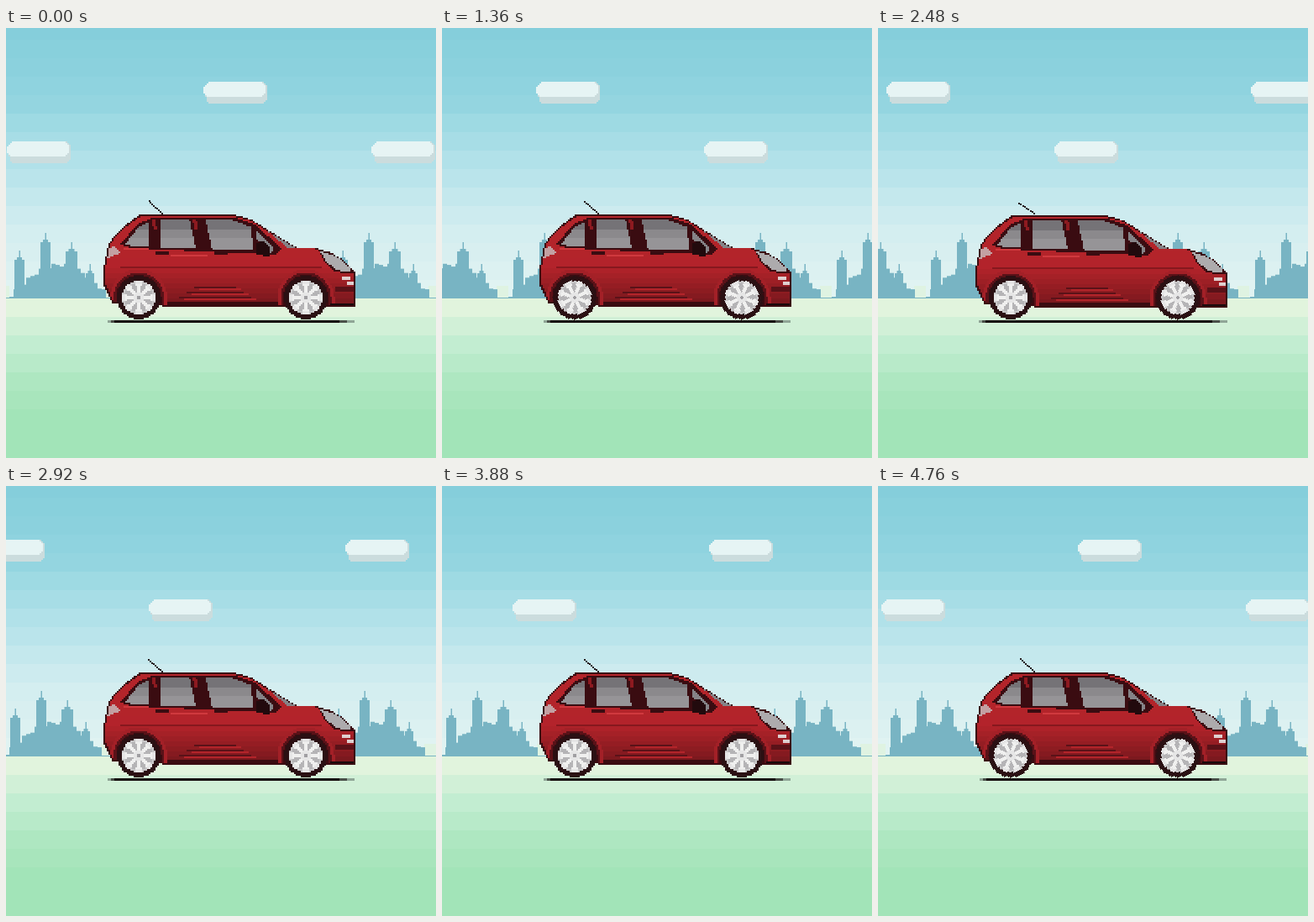
An HTML page with a canvas for the animation above (4.8 s loop, 512x512 px).

```html
<!DOCTYPE html>
<html lang="en">
<head>
<meta charset="utf-8">
<title>Red car drive</title>
<style>
html, body { margin: 0; width: 100%; height: 100%; overflow: hidden; }
canvas { display: block; width: 512px; height: 512px; }
</style>
</head>
<body>
<canvas id="stage" width="512" height="512"></canvas>
<script>
const LOOP = 4800, STEP = 40, CELL = 2;
const CLOUD_GAP = 434, CITY_GAP = 128.4;
const BAND = 22, BANDS = 24, HORIZON = 15;
const WHEELS = [158, 357], AXLE = 321;
const DARK = '#3a0c11', MAROON = '#5a1218', SHINE = '#d0393e', CITY = '#78b4c3';
const ctx = document.getElementById('stage').getContext('2d');

function layer(w, h, paint) {
  const canvas = document.createElement('canvas');
  canvas.width = w;
  canvas.height = h;
  paint(canvas.getContext('2d'));
  return canvas;
}

function rect(g, color, x, y, w, h) {
  g.fillStyle = color;
  g.fillRect(x, y, w, h);
}

// Fills a polygon in hard-edged square cells.
function poly(g, color, ...pts) {
  const n = pts.length / 2, ys = pts.filter((_, i) => i % 2);
  const snap = v => Math.round(v / CELL) * CELL;
  for (let y = snap(Math.min(...ys)); y < Math.max(...ys); y += CELL) {
    const xs = [], mid = y + CELL / 2;
    for (let i = 0; i < n; i++) {
      const j = (i + 1) % n;
      const x1 = pts[2 * i], y1 = pts[2 * i + 1], x2 = pts[2 * j], y2 = pts[2 * j + 1];
      if (y1 > mid !== y2 > mid) xs.push(x1 + (mid - y1) * (x2 - x1) / (y2 - y1));
    }
    xs.sort((a, b) => a - b);
    for (let i = 0; i + 1 < xs.length; i += 2) {
      rect(g, color, snap(xs[i]), y, snap(xs[i + 1]) - snap(xs[i]), CELL);
    }
  }
}

function arch(g, color, cx, r) {
  const pts = [];
  for (let a = Math.PI; a < 6.4; a += Math.PI / 16) {
    pts.push(cx + r * Math.cos(a), AXLE + r * Math.sin(a));
  }
  poly(g, color, ...pts, cx + r, 334, cx - r, 334);
}

// One pixel row per band, stretched when drawn.
const backdrop = layer(1, BANDS, g => {
  const fade = (from, to, ...colors) => {
    const ramp = g.createLinearGradient(0, from + .5, 0, to - .5);
    colors.forEach((c, i) => ramp.addColorStop(i / (colors.length - 1), c));
    rect(g, ramp, 0, from, 1, to - from);
  };
  fade(0, HORIZON, '#85cedb', '#90d4df', '#b1e1e9', '#d2edf0', '#e0f3f2');
  fade(HORIZON, BANDS, '#e1f4dd', '#c2edd1', '#aee7c1', '#a2e4b8', '#a2e4b8');
});

const cloud = layer(80, 30, g => {
  poly(g, '#cbdcdd', 0, 10, 6, 26, 70, 26, 76, 20, 76, 6, 70, 0);
  poly(g, '#e6f4f4', 0, 6, 6, 0, 70, 0, 74, 6, 74, 13, 69, 19, 5, 19, 0, 14);
});

const city = layer(130, 84, g => {
  rect(g, '#dff3e2', 114, 68, 14, 15);
  rect(g, CITY, 0, 82, 130, 1);
  for (let x = 0; x < 115; x += 5) {
    const h = 2 + 36 * Math.sin(Math.PI * x / 115) + x % 3 * 2;
    rect(g, CITY, x, 83 - h, 5, h);
  }
  for (const [mid, top, w] of [[12, 26, 12], [43, 5, 12], [74, 16, 14], [96, 42, 10]]) {
    rect(g, CITY, mid - .5, top, 1.5, 12);
    rect(g, CITY, mid - w / 4, top + 8, w / 2, 5);
    rect(g, CITY, mid - w / 2, top + 11, w, 72 - top);
  }
});

const glass = layer(512, 512, g => {
  poly(g, '#757377', 142, 257, 158, 237, 174, 229, 268, 228, 292, 237, 294, 265, 150, 260);
  g.globalCompositeOperation = 'source-atop';
  rect(g, '#8b898c', 0, 240, 512, 10);
  rect(g, '#969497', 0, 250, 512, 20);
  for (const [x, w, lean] of [[169, 14, 2], [218, 19, 9]]) {
    poly(g, DARK, x, 226, x + w, 226, x + w + lean, 266, x + lean, 266);
    poly(g, '#8d1a20', x + 3, 226, x + 8, 226, x + 11, 240, x + 7, 240);
  }
});

const car = layer(512, 512, g => {
  const shell = [
    160, 222, 270, 222, 292, 228, 345, 261, 368, 262, 386, 267, 401, 276,
    416, 290, 416, 332, 186, 331, 126, 327, 116, 305, 116, 287, 122, 258,
    128, 248, 140, 236
  ];
  const inset = shell.map((v, i) => i % 2 ? 276 + (v - 276) * .965 : 266 + (v - 266) * .987);
  poly(g, '#b3242a', ...inset);
  g.globalCompositeOperation = 'source-atop';

  // Flanks darken toward the sill
  for (let y = 274; y < 334; y += 6) {
    rect(g, `hsl(357 67% ${42 - Math.max(0, y - 282) * .32}%)`, 116, y, 302, 6);
  }
  rect(g, '#86181e', 136, 284, 240, 2);
  rect(g, SHINE, 140, 262, 104, 2);
  rect(g, SHINE, 196, 270, 44, 2);
  rect(g, DARK, 186, 326, 148, 6);
  for (let i = 0; i < 3; i++) {
    rect(g, MAROON, 224 - 9 * i, 308 + 6 * i, 50 + 18 * i, 2);
    rect(g, '#b3242a', 230 - 9 * i, 310 + 6 * i, 50 + 18 * i, 2);
  }
  for (const cx of WHEELS) {
    arch(g, '#a32027', cx, 34);
    arch(g, MAROON, cx, 30);
    arch(g, DARK, cx, 27);
  }

  // Windows, mirror and windscreen
  poly(g, DARK, 136, 258, 156, 234, 172, 227, 272, 226, 296, 234, 328, 262, 320, 270, 148, 262);
  g.drawImage(glass, 0, 0);
  poly(g, '#858387', 304, 236, 312, 240, 344, 261, 336, 262);
  poly(g, '#858387', 298, 242, 318, 262, 316, 268, 299, 252);
  poly(g, '#220a0d', 297, 256, 306, 254, 315, 262, 313, 272, 298, 270);

  // Handles, lamps and bumper
  for (const x of [178, 248]) rect(g, DARK, x, 266, 16, 4);
  poly(g, '#c3a0a2', 121, 262, 130, 260, 136, 268, 118, 275);
  poly(g, DARK, 372, 264, 394, 269, 416, 286, 412, 293, 392, 290, 380, 280);
  poly(g, '#adabad', 374, 266, 392, 271, 411, 285, 408, 291, 394, 288, 382, 279);
  for (const y of [296, 302]) rect(g, '#dfcfcf', 104 + y, y, 10, 4);
  rect(g, MAROON, 392, 308, 26, 6);
  rect(g, '#1b090b', 386, 328, 32, 6);

  g.globalCompositeOperation = 'destination-over';
  poly(g, DARK, ...shell);
});

const wheel = layer(54, 54, g => {
  for (let y = -25; y <= 25; y += CELL) {
    for (let x = -25; x <= 25; x += CELL) {
      const r = Math.hypot(x, y), spoke = Math.cos(8 * Math.atan2(y, x)) > -.1;
      if (r > 25.6) continue;
      const color =
        r > 20 ? '#2b1013' :
        r > 17 ? (spoke ? '#e6e6e6' : '#c8c7c8') :
        r > 6 ? (spoke ? '#f0f0ef' : '#b5b4b6') :
        r > 2 ? '#e6e6e6' : '#a09fa2';
      rect(g, color, x + 26, y + 26, CELL, CELL);
    }
  }
});

function drawWheel(cx, turned) {
  ctx.save();
  ctx.translate(cx, AXLE);
  if (turned) ctx.rotate(-.45);
  ctx.drawImage(wheel, -27, -27);
  ctx.restore();
}

function tile(image, start, gap, y) {
  for (let x = start % gap - gap; x < 512; x += gap) ctx.drawImage(image, Math.round(x), y);
}

function draw(ms) {
  const tick = Math.floor(ms % LOOP / STEP), left = 1 - tick * STEP / LOOP;
  const drift = CLOUD_GAP * left;
  const bounce = (1 - Math.cos(2 * Math.PI * (tick % 12 / 12) ** .75)) / 2;

  ctx.imageSmoothingEnabled = false;
  ctx.drawImage(backdrop, 0, 322 - HORIZON * BAND, 512, BANDS * BAND);
  tile(cloud, 234.5 + drift, CLOUD_GAP, 64);
  tile(cloud, .5 + drift, CLOUD_GAP, 135);
  tile(city, 4 + CITY_GAP * 5 * left, CITY_GAP, 239);

  // Ground shadow widens as the body sinks
  const spread = Math.round(2 * bounce);
  ['#8fa596', '#4a5049', '#160b0c'].forEach((color, i) => {
    rect(ctx, color, 121 - spread + 4 * i, 348, 294 + 2 * spread - 13 * i, 3);
  });

  // Antenna whips back around its foot
  const tipX = 170.5 - 4.2 * bounce, tipY = 206 + 5.6 * bounce;
  for (let k = 0; k <= 1; k += 1 / 8) {
    rect(ctx, '#241a1d', Math.round(tipX + (186 - tipX) * k) - 1, Math.round(tipY + (221 - tipY) * k) - 1, 2, 2);
  }

  ctx.drawImage(car, 0, Math.round(bounce));
  drawWheel(WHEELS[0], tick % 6 >= 3);
  drawWheel(WHEELS[1], tick % 6 >= 2);
}

const begin = performance.now();
function frame() {
  draw(performance.now() - begin);
  requestAnimationFrame(frame);
}
frame();
</script>
</body>
</html>
```
